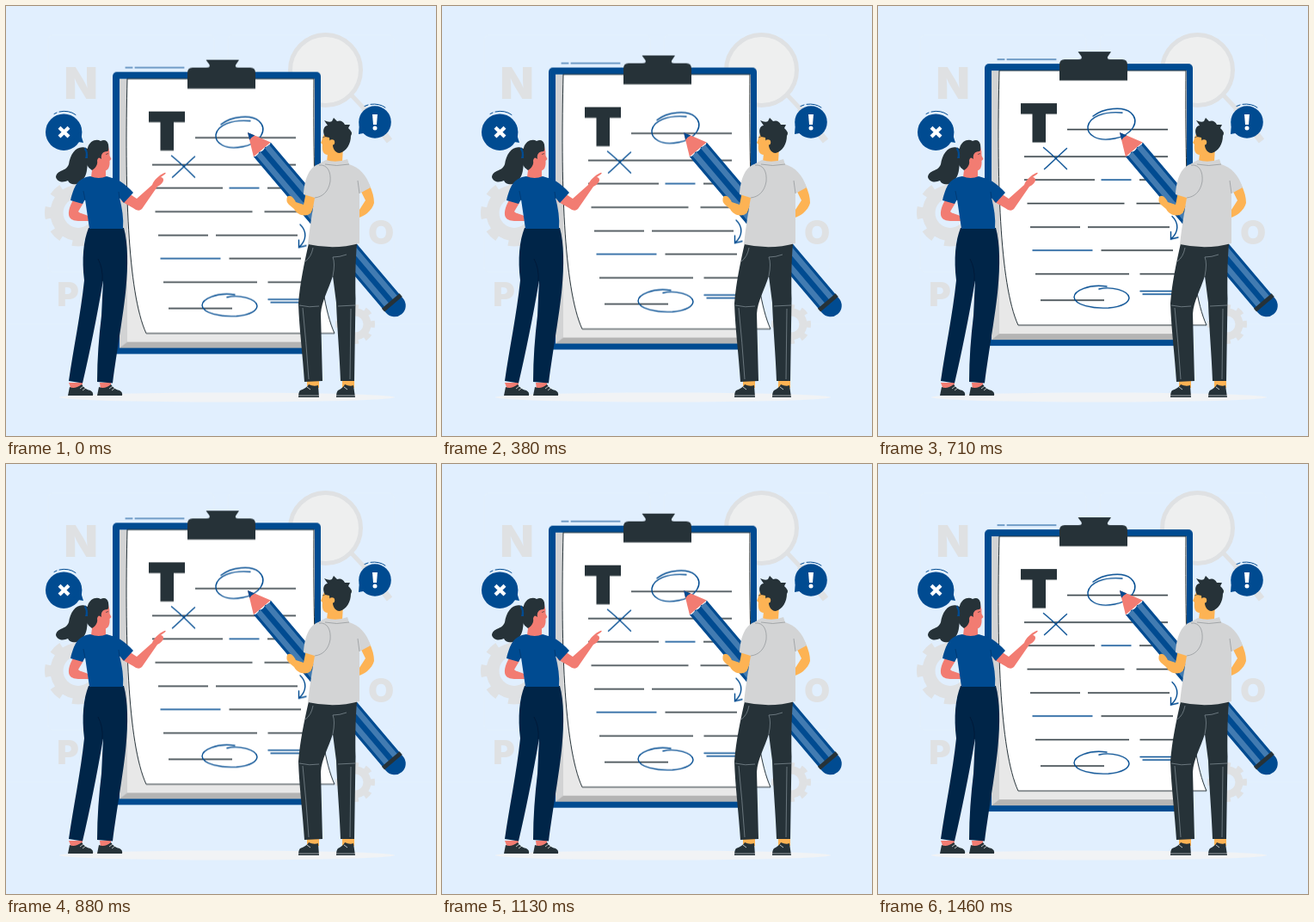
Animation, 500 px wide and 500 px high, one loop 1500 ms. Source, as an HTML page:

```html
<!DOCTYPE html>
<html lang="en">
<head>
<meta charset="utf-8">
<title>Proofreading</title>
<style>
  html, body { margin: 0; width: 100%; height: 100%; overflow: hidden; background: #e1effe; }
  svg { display: block; width: 100%; height: 100%; }
  .board { animation: float 1.5s linear infinite; }
  @keyframes float {
    0%, 100% { transform: translateY(.6px); }
    50% { transform: translateY(-9.4px); }
  }

  .blue { fill: #004b91; }
  .navy { fill: #002548; }
  .dark { fill: #263238; }
  .skin { fill: #f27c72; }
  .tan { fill: #fdb354; }
  .shirt { fill: #d3d4d5; }
  .hair { fill: #263238; }
  .pale { fill: #dfe1e3; }
  .line { fill: none; stroke: #263238; stroke-width: 1.4; }
  .pen { fill: none; stroke: #004b91; stroke-width: 1.4; stroke-linecap: round; }
  .thin { stroke-width: 1; }
  .seam { fill: none; stroke: #263238; stroke-width: .6; }
  .fold { fill: none; stroke: #87949b; stroke-width: .7; }
  .ring { fill: none; stroke: #dfe1e3; }
  .frame { fill: none; stroke: #e4f0fc; stroke-width: .8; }
  .letter { font-family: Inter, "Open Sans", sans-serif; font-weight: 900; text-anchor: middle; }
</style>
</head>
<body>
<svg viewBox="0 0 500 500">
  <!-- backdrop -->
  <g class="frame">
    <rect x="49" y="34" width="193" height="275" rx="5"/>
    <rect x="258" y="34" width="193" height="275" rx="5"/>
    <path d="M0 370 H500"/>
  </g>
  <ellipse cx="257" cy="455" rx="195" ry="5.5" fill="#f1f3f5"/>
  <g class="pale letter">
    <text x="87" y="108" font-size="51">N</text>
    <text x="72" y="349" font-size="39">P</text>
    <text x="436" y="277" font-size="39">O</text>
  </g>
  <path d="M402 104 L418 121" class="ring" stroke-width="5"/>
  <path d="M416 119 L446 157" class="ring" stroke-width="8"/>
  <circle cx="371.500" cy="74.500" r="41" fill="#eeefef" stroke="#dfe1e3" stroke-width="5"/>
  <g class="ring">
    <circle cx="84" cy="240.500" r="25" stroke-width="15"/>
    <circle cx="84" cy="240.500" r="35" stroke-width="8" pathLength="80" stroke-dasharray="5 5" stroke-dashoffset="2.5"/>
    <circle cx="406" cy="370" r="14" stroke-width="9"/>
    <circle cx="406" cy="370" r="20" stroke-width="6" pathLength="80" stroke-dasharray="5 5" stroke-dashoffset="2.5"/>
  </g>

  <!-- clipboard -->
  <g class="board">
    <path d="M139 71 H147 M150 71 H207" class="pen thin"/>
    <rect x="124" y="76" width="242" height="328" rx="5" class="blue"/>
    <rect x="132" y="84" width="227" height="313" fill="#e8e8e8"/>
    <path d="M132 84 H141 V390 L132 397 Z" fill="#d2d3d4"/>
    <path d="M132 397 L141 390 H359 V397 Z" fill="#b4b4b4"/>
    <path d="M141 84 C138 205 141 332 163 380 H382 C360 332 357 205 358 84 Z" fill="#fff" stroke="#263238"/>
    <path d="M211 95.500 V77 Q211 71 217 71 H233 Q238 71 236.500 67.500 L232.500 62 H271 L267 68 Q266 71 270 71 H284 Q290 71 290 77 V95.500 Z" class="dark"/>
    <path d="M166 122 H208 V134.500 H195 V167.500 H179.500 V134.500 H166 Z" class="dark"/>
    <path class="line" d="M220 152.500 H337 M170 184 H337 M170 211 H252 M304 211 H340
      M173.500 238.500 H286.500 M300.500 238.500 H340 M177 266 H235 M244 266 H339
      M259.500 293 H343 M183 320.500 H292 M304.500 320.500 H346 M189 351 H263"/>
    <path class="pen" d="M260 211 H294 M180 293 H249 M305 340.500 H345 M308 344 H346"/>
    <path class="pen" d="M250 137 C262 127.500 285 125 294 133 C305 143 296 159 275 163 C255 167 243 159 244 149 C246 138 262 131 284 133"/>
    <path class="pen" d="M266 335 C245 332 228 340 228 347.500 C229 357 250 361 268 360 C285 358.500 292 353 292 348 C291 340 272 334.500 257 338"/>
    <path class="pen" d="M192.500 173.500 C202 181 211 190 219.500 198.500 M219.500 174.500 C212 181 202 191 193.500 198.500"/>
    <path class="pen" d="M342 253.500 C350 261 350 272 340.500 280 M340.500 271.500 L340.500 280 L349 278"/>
  </g>

  <!-- pencil -->
  <g transform="translate(281 147) rotate(49.7)">
    <path d="M0 0 L26 -13 V13 Z" class="skin"/>
    <path d="M0 0 L8 -4 Q7 0 8 4 Z" class="blue"/>
    <path d="M26 -13 H264 A13 13 0 0 1 264 13 H26 Q29 9 26 4.500 Q29 0 26 -4.500 Q29 -9 26 -13 Z" class="blue"/>
    <path d="M27 -6.500 H258 M27 6.500 H258" stroke="#427bb1" stroke-width="6.500"/>
    <path d="M257 -13.500 H262 V13.500 H257 Z" class="dark"/>
  </g>

  <!-- speech bubbles -->
  <circle cx="67.200" cy="146.700" r="21.200" class="blue"/>
  <path d="M86 146 L90 159 L78 157 Z" class="blue"/>
  <path d="M62 141.200 L73 152 M73 141.200 L62 152" stroke="#fff" stroke-width="4.200"/>
  <path class="pen thin" d="M56 125.500 L59 124 M62 123 Q73 120.500 81 126.500"/>
  <circle cx="429" cy="135" r="18.800" class="blue"/>
  <path d="M411 136 L410 149 L421 147 Z" class="blue"/>
  <path d="M426 126 H432 L431 138 H427 Z" fill="#fff"/>
  <circle cx="429" cy="142" r="2.500" fill="#fff"/>
  <path class="pen thin" d="M417 116.500 L421 115 M424 114.300 Q434 113 441 118"/>

  <!-- woman -->
  <g>
    <path d="M95 166 C84 160 75 170 73 184 C70 193 59 190 58 199 C60 206 68 205 72 203 C75 210 86 208 90 201 C96 194 93 184 97 178 Z" class="hair"/>
    <path d="M79 224 C73 234 71 243 75 247 C79 251 88 250 96 250 L95 244 C90 241 87 242 84 239 L90 229 Z" class="skin"/>
    <path d="M143 218 L152 224 L170 208 C172 202 178 197 184 194 Q187 193 185 195.500 L180 199 C185 200 184 206 176 210 L158 236 Q154 240 148 235 L134 227 Z" class="skin"/>
    <path d="M101 183 L99 199 Q108 204 116 199 V190 Z" class="skin"/>
    <path d="M104 164 L119 164 Q121 169 120.500 174 L122.500 178 L120.500 180 C121 187 119 192 113 192 Q106 191 102 186 Z" class="skin"/>
    <path d="M95 165 C97 157 105 154 110 157 Q117 154 119 161 Q120 168 118 169 C112 169 110 173 111 178 Q107 174 106 180 C107 184 104 189 100 191 Q92 187 93 174 Z" class="hair"/>
    <path d="M92 164 Q96 169 95 177 L92 177 Q94 170 91 167 Z" class="blue"/>
    <path d="M116 172.500 L119 171.500" class="seam"/>
    <path d="M73 438 H89 L88 446 H76 Z M109 438 H122 V446 H110 Z" class="skin"/>
    <path d="M96 258 H137 C142 276 142 302 139.500 328 C137 356 129 400 124 438.500 L106 437 C106 410 108 385 111 360 L113 319 C106 360 97 405 89 438.500 L73 436 C78 401 87 357 91 319 C88 294 90 273 96 258 Z" class="navy"/>
    <path d="M112 320 Q113 305 107 294" fill="none" stroke="#001a39"/>
    <path d="M98 198 Q108 202 117 198 L130 202 Q141 209 148 217 L137 229 L132 223 C135 235 137 247 136 259 H97 L92 225 L89 230 L75 226 C79 210 83 200 98 198 Z" class="blue"/>
    <path d="M92 226 L90 215 M132 224 L131 216" fill="none" stroke="#00376e" stroke-width=".8"/>
    <path d="M74 443 Q80 446 88 440 Q92 446 98 447 Q102 449 101 453 H72 Z M108 443 Q115 446 122 440 Q126 446 132 447 Q136 449 135 453 H106 Z" class="dark"/>
    <path d="M86 445 L90 442 M89 447 L93 444 M120 445 L124 442 M123 447 L127 444" stroke="#fff" stroke-width=".7"/>
  </g>

  <!-- man -->
  <g>
    <path d="M349 216 L346 231 L337 228 C334 222 330 219 327 222 Q325 227 329 231 L335 236 C339 244 350 246 355 240 L363 218 Z" class="tan"/>
    <path d="M412 214 L418 226 L409 240 V246 C415 246 426 238 428 229 Q428 219 422 207 Z" class="tan"/>
    <path d="M350 435 H364 V444 H350 Z M391 435 H405 V444 H391 Z" class="tan"/>
    <path d="M352 276 H408 C407 290 406 305 406.500 340 L405 436 H389 C388 406 385 374 384 345 L380 314 C375 330 367 343 366 358 L368 436 L347 437 C345 405 341 376 340 346 C342 321 347 298 352 276 Z" class="dark"/>
    <path class="fold" d="M341 348 Q353 351 364 349 M386 349 L406 348 M380 314 Q383 299 380 292 Q388 292 396 289 M357 281 Q355 292 348 297 M345 351 Q349 390 352 434 M401 352 L400 434"/>
    <path d="M375 163 L373 181 Q382 187 391 181 L392 164 Z" class="tan"/>
    <path d="M372 146 C367 153 368 156 366 159 L368 161 C367 168 369 173 374 173 Q386 175 391 164 L391 144 Z" class="tan"/>
    <path d="M371 152 C367 145 370 139 374 139 L370 133 Q376 136 379 134 L381 130 L385 134 Q391 132 394 138 L400 138 L398 142 Q404 147 401 151 C401 160 396 169 388 171 C382 171 379 164 380 158 Q376 160 376 153 Z" class="hair"/>
    <circle cx="379" cy="158.500" r="3.200" class="tan"/>
    <path d="M368 153 L372 151.500" class="seam"/>
    <path d="M372 179 Q384 183 397 178 L399 184 C411 188 419 196 424 211 L411 218 L411 276 Q382 284 351 277 C353 259 356 240 359 223 L346 219 C347 202 352 188 363 184 Z" class="shirt"/>
    <path d="M364 185 C374 184 378 193 377 204 C375 216 368 222 359 223 M411 218 L409 203 M371 184 Q384 187 399 184" fill="none" stroke="#8f9396" stroke-width=".7"/>
    <path d="M342 447 Q350 444 352 440 Q358 443 363 441 L364 455 H340 Q340 449 342 447 Z M386 447 Q392 444 394 440 Q400 443 404 441 L406 455 H384 Q384 449 386 447 Z" class="dark"/>
    <path d="M340 453 H364 M384 453 H406" stroke="#e4e8eb" stroke-width=".6"/>
    <path d="M350 443 L354 446 M393 443 L397 446" stroke="#fff" stroke-width=".7"/>
  </g>
</svg>
</body>
</html>
```
